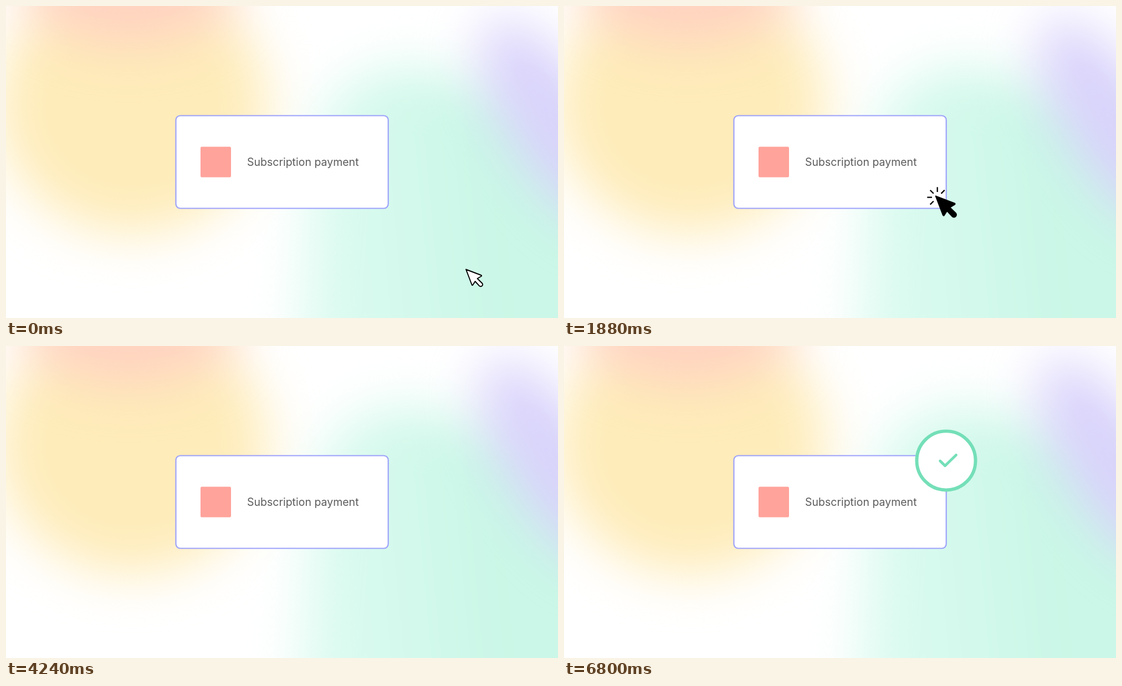
These frames come from a looping animation (996x562 px, 6.84 s). An HTML page:

```html
<!DOCTYPE html>
<html lang="en">
<head>
<meta charset="utf-8">
<title>Subscription payment</title>
<style>
  html, body { margin: 0; width: 100%; height: 100%; overflow: hidden; background: #fff; }
  svg { display: block; width: 100%; height: 100%; }
  text { font-family: Inter, sans-serif; }
</style>
</head>
<body>
<svg viewBox="0 0 996 562">
  <defs>
    <filter id="soft" filterUnits="userSpaceOnUse" x="-300" y="-300" width="1600" height="1200" color-interpolation-filters="sRGB">
      <feGaussianBlur stdDeviation="45"/>
    </filter>
    <linearGradient id="mint" gradientUnits="userSpaceOnUse" x1="560" y1="430" x2="880" y2="400">
      <stop offset="0" stop-color="#ddfbf1"/>
      <stop offset="1" stop-color="#caf7e7"/>
    </linearGradient>
    <path id="arrow" stroke-linejoin="round" d="M0 0L27.5 10.5Q28.8 11.5 27.5 12.3L20.5 16.5L29 24.7A3.5 3.5 0 0 1 24 29.7L16.5 21.5L12.3 28Q11.3 29.2 10.5 27.5Z"/>
  </defs>

  <rect width="996" height="562" fill="#fff"/>
  <ellipse cx="228" cy="180" rx="245" ry="232" fill="#feecba" filter="url(#soft)"/>
  <ellipse cx="222" cy="-30" rx="190" ry="98" fill="#ffd2c0" filter="url(#soft)"/>
  <path d="M525 700L548 300Q550 110 740 110L1150 220V700Z" fill="url(#mint)" filter="url(#soft)"/>
  <g filter="url(#soft)">
    <ellipse rx="215" ry="82" transform="translate(990 212) rotate(58)" fill="#d9d2fb"/>
  </g>

  <rect x="306.5" y="197.5" width="383.2" height="167" rx="8" fill="#fff" stroke="#9da1fb" stroke-width="2.2"/>
  <rect x="351" y="253.5" width="55" height="55" rx="2.5" fill="#ffa39b"/>
  <text x="435" y="288" font-size="19.5" fill="#5c5c5c">Subscription payment</text>

  <g id="badge">
    <rect x="-87.5" y="-25.2" width="175" height="50.4" rx="11" fill="#ff8e91"/>
    <text x=".4" y="7.6" font-size="20.6" letter-spacing=".8" text-anchor="middle" fill="#9c1f48">FAILURE</text>
  </g>
  <g id="pointer">
    <use href="#arrow" fill="#fff" stroke="#000" stroke-width="1.9"/>
  </g>
  <g id="click">
    <use href="#arrow" x="-9.6" y="-9.1" stroke="#000" stroke-width="1.6"/>
    <path id="rays" transform="translate(-7.2 -7.2)" stroke="#000" stroke-width="1.8"/>
  </g>
  <g id="done">
    <circle r="51.8" fill="#fff" stroke="#74dfb8" stroke-width="5.8"/>
    <path d="M-10.6 .6L-1.9 9.2L17.6 -9.8" fill="none" stroke="#74dfb8" stroke-width="4.7" stroke-linecap="round" stroke-linejoin="round"/>
  </g>
</svg>
<script>
const LOOP = 6840, STEP = 40;
const el = id => document.getElementById(id);
const span = (t, a, b) => Math.min(1, Math.max(0, (t - a) / (b - a)));
const easeOut = u => Math.sin(u * Math.PI / 2);
const easeInOut = u => (1 - Math.cos(u * Math.PI)) / 2;
const mix = (a, b, u) => a + (b - a) * u;

// Grows from half size, overshoots a little, then settles.
const pop = t => 0.5 + 0.535 * easeOut(span(t, 0, 1060)) - 0.035 * easeInOut(span(t, 1060, 1600));
const appear = t => t < 0 ? 0 : mix(0.5, 1, span(t, 0, 280));

function place(id, x, y, scale, opacity) {
  const node = el(id);
  node.setAttribute('transform', `translate(${x} ${y}) scale(${scale})`);
  node.setAttribute('opacity', opacity);
}

function draw(t) {
  const leave = 1 - span(t, 3600, 4240);

  const move = easeInOut(span(t, 0, 720));
  place('pointer', mix(830, 673.2, move), mix(474.5, 344.6, move), 1, 1 - span(t, 840, 1320));

  const press = easeInOut(span(t, 1440, 2320)) - easeInOut(span(t, 2460, 3150));
  place('click', 682.6, 353.6, 1 + 0.48 * press, span(t, 720, 1320) * leave);

  place('badge', 729.5, 197.4, pop(t - 2000), appear(t - 2000) * leave);

  const rise = easeOut(span(t, 5880, 6600));
  place('done', 689.5, mix(219, 206.4, rise), pop(t - 5880), appear(t - 5880));
}

el('rays').setAttribute('d', [90, 135, 180, 225, 315].map(deg => {
  const a = (deg + 45) * Math.PI / 180 - Math.PI / 4;
  const at = r => `${r * Math.cos(a)} ${-r * Math.sin(a)}`;
  return `M${at(7.8)}L${at(14.8)}`;
}).slice(0, 4).concat('M5.5 -5.5L10.5 -10.5').join(''));

const start = performance.now();
function tick() {
  const t = (performance.now() - start) % LOOP;
  draw(Math.floor(t / STEP) * STEP);
  requestAnimationFrame(tick);
}
draw(0);
tick();
</script>
</body>
</html>
```
